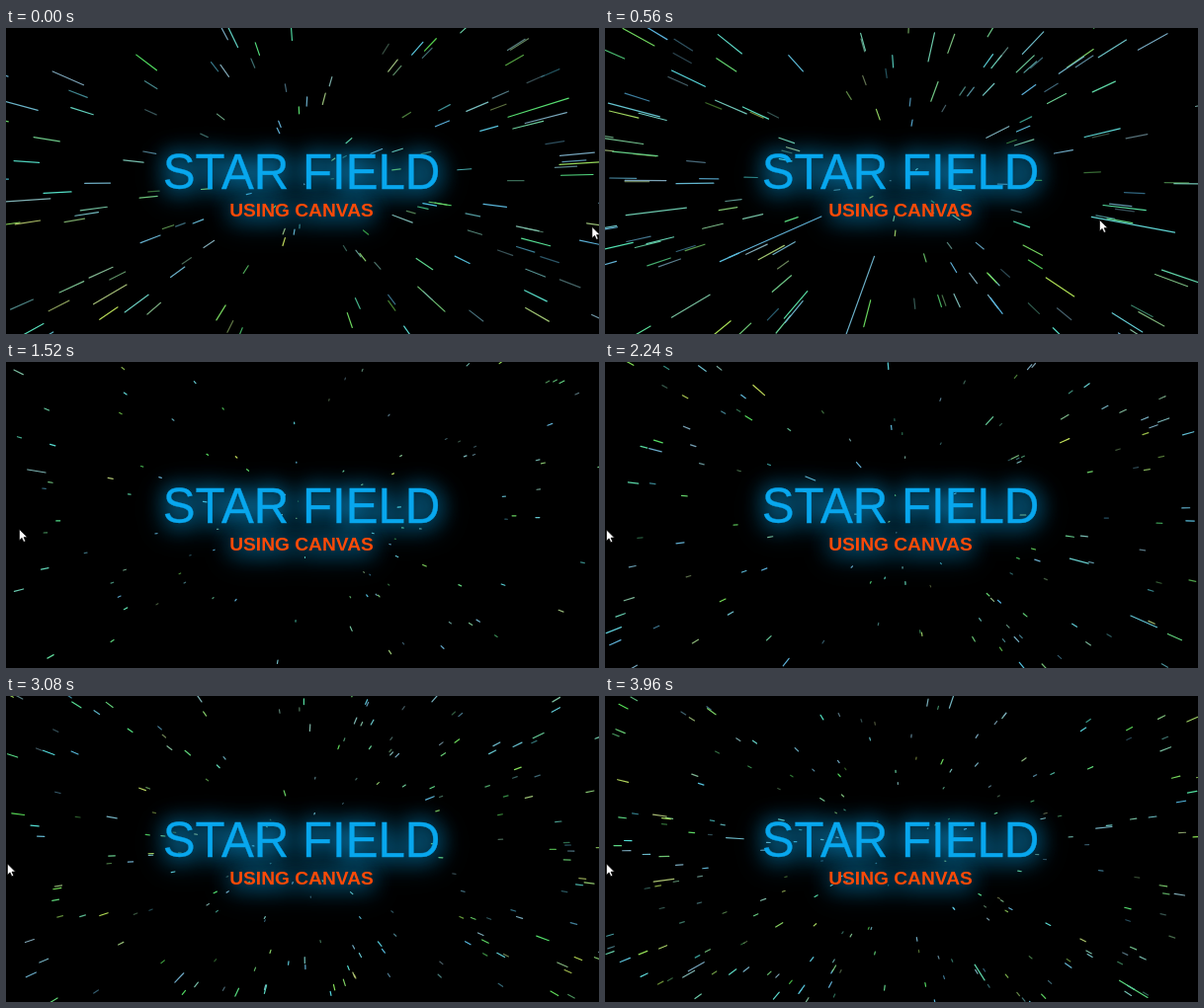
These frames come from a looping animation (600 px wide and 310 px high, 4 s). An HTML page with a canvas:

```html
<!DOCTYPE html>
<html lang="en">
<head>
<meta charset="utf-8">
<title>Star field</title>
<style>
  html, body { margin: 0; width: 100%; height: 100%; overflow: hidden; background: #000; }
  canvas, svg { position: absolute; left: 0; top: 0; display: block; }
  text { font-family: "Liberation Sans", Arial, sans-serif; text-anchor: middle; }
  .title { font-size: 49.2px; fill: #08a7ee; stroke: #08a7ee; stroke-width: .35px; }
  .subtitle { font-size: 19.2px; font-weight: bold; fill: #ff4a08; }
  .glow { filter: drop-shadow(0 0 11px #08a2e8) drop-shadow(0 5px 11px #08a2e870); }
</style>
</head>
<body>
<canvas id="sky" width="600" height="310"></canvas>
<svg width="600" height="310">
  <text class="title glow" x="299.1" y="162.8">STAR FIELD</text>
  <text class="subtitle glow" x="299" y="190.9">USING CANVAS</text>
  <path id="cursor" d="M0 0V11.2L2.6 8.8L4.4 12.8L6.2 12L4.5 8.1H8Z" fill="#fff" stroke="#000" stroke-width=".6"/>
</svg>
<script>
const WIDTH = 600, HEIGHT = 310, LOOP = 4000, STEP = 40;
const SPREAD_X = 270, SPREAD_Y = 145;

// time, cursor x, cursor y, depth travelled per step, number of stars
const KEYS = [
  [0, 593, 201.5, .075, 340],
  [560, 500.5, 194.5, .085, 360],
  [1520, 13.5, 169.5, .012, 260],
  [2240, 1.5, 170, .02, 330],
  [2720, 1.5, 170, .021, 400],
  [3440, 1.5, 170, .021, 540],
  [4000, 1.5, 170, .02, 590]
];

const ctx = document.getElementById('sky').getContext('2d');
const cursor = document.getElementById('cursor');

function stateAt(ms) {
  const i = KEYS.findIndex(key => key[0] > ms);
  const a = KEYS[i - 1], b = KEYS[i];
  const p = (ms - a[0]) / (b[0] - a[0]);
  const [, x, y, speed, count] = a.map((v, k) => v + (b[k] - v) * p);
  return { x, y, speed, count };
}

// Repeatable random number in 0..1
function hash(a, b, c) {
  let h = Math.imul(a + 1, 0x9E3779B1) ^ Math.imul(b + 7, 0x85EBCA6B) ^ Math.imul(c + 3, 0xC2B2AE35);
  h = Math.imul(h ^ (h >>> 15), 0x2C1B3C6D);
  h = Math.imul(h ^ (h >>> 12), 0x297A2D39);
  return ((h ^ (h >>> 15)) >>> 0) / 4294967296;
}

let travelled = 0;
const steps = Array.from({ length: LOOP / STEP }, (_, n) => {
  const state = stateAt(n * STEP);
  travelled += state.speed;
  return { ...state, travelled };
});

function drawStar(i, { speed, travelled }) {
  const path = hash(i, 0, 0) + travelled;
  const life = Math.floor(path);
  const z = 1 - (path - life);
  const x = (hash(i, life, 1) * 2 - 1) * SPREAD_X;
  const y = (hash(i, life, 2) * 2 - 1) * SPREAD_Y;
  const tail = z + speed;
  if (Math.abs(x / tail) > WIDTH / 2 || Math.abs(y / tail) > HEIGHT / 2) return;

  const hue = 200 - hash(i, life, 3) ** 2 * 130;
  const saturation = 25 + hash(i, life, 4) * 45;
  ctx.globalAlpha = Math.min(1, .4 + 2.5 * (1 - z));
  ctx.strokeStyle = `hsl(${hue}, ${saturation}%, 60%)`;
  ctx.beginPath();
  ctx.moveTo(x / tail, y / tail);
  ctx.lineTo(x / z, y / z);
  ctx.stroke();
}

function render(step) {
  ctx.setTransform(1, 0, 0, 1, 0, 0);
  ctx.globalAlpha = 1;
  ctx.fillStyle = '#000';
  ctx.fillRect(0, 0, WIDTH, HEIGHT);
  ctx.translate(WIDTH / 2, HEIGHT / 2);
  ctx.lineWidth = 1.2;
  ctx.lineCap = 'round';
  for (let i = 0; i < step.count; i++) drawStar(i, step);
  cursor.setAttribute('transform', `translate(${step.x} ${step.y})`);
}

const start = performance.now();
let shown = -1;
function tick() {
  const n = Math.floor((performance.now() - start) % LOOP / STEP);
  if (n !== shown) render(steps[shown = n]);
  requestAnimationFrame(tick);
}
tick();
</script>
</body>
</html>
```
